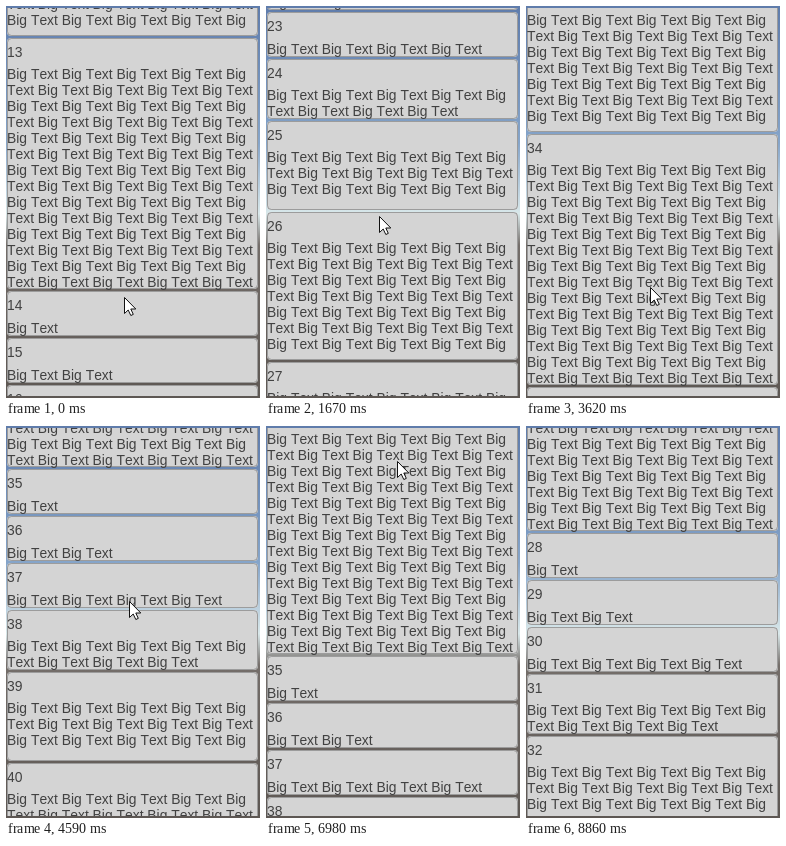
An HTML page with a canvas for the animation above (8.96 s loop, 254 by 392 pixels).

```html
<!DOCTYPE html>
<html lang="en">
<head>
<meta charset="utf-8">
<title>Big Text list</title>
<style>
  html, body { margin: 0; width: 100%; height: 100%; overflow: hidden; background: #5a5450; }
  canvas { display: block; }
</style>
</head>
<body>
<canvas id="stage" width="254" height="392"></canvas>
<script>
const W = 254, H = 392;
const LOOP = 8960, STEPS = 68, STEP_PHASE = 0.6;
const WORDS_PER_LINE = 9, LINE_HEIGHT = 16, ROW_KINDS = 7;
const ctx = document.getElementById('stage').getContext('2d');

// Key points by screen update; each drag of the list gives one sweep of the pointer.
const SCROLL = [
  { at: 0, y: 1095 }, { at: 7, y: 1827 }, { at: 20, y: 2515 }, { at: 28, y: 3090 },
  { at: 42, y: 3722 }, { at: 44, y: 3765 }, { at: 53, y: 3241 }, { at: 67, y: 2667 }
];
const POINTER = [
  { at: 0, x: 118, y: 291 }, { at: 7, x: 86, y: 111 }, { at: 20, x: 146, y: 335 },
  { at: 24, x: 128, y: 2 }, { at: 28, x: 124, y: 281 }, { at: 42, x: 123, y: 69 },
  { at: 48, x: 135, y: 300 }, { at: 53, x: 131, y: 35 }, { at: 66, x: 140, y: 410 }
];

// Smooth curve through the keys; flat at turning points.
function follow(keys, at, axis) {
  const last = keys.length - 1;
  const slope = i => {
    const a = keys[Math.max(i - 1, 0)], b = keys[i], c = keys[Math.min(i + 1, last)];
    const turns = (b[axis] - a[axis]) * (c[axis] - b[axis]) < 0;
    return turns ? 0 : (c[axis] - a[axis]) / (c.at - a.at);
  };
  let i = 0;
  while (i < last - 1 && at >= keys[i + 1].at) i++;
  const a = keys[i], b = keys[i + 1], span = b.at - a.at;
  const u = Math.min((at - a.at) / span, 1), v = 1 - u;
  return Math.round(a[axis] * (1 + 2 * u) * v * v + b[axis] * u * u * (3 - 2 * u)
    + span * (slope(i) * u * v * v - slope(i + 1) * u * u * v));
}

// Text doubles from row to row, then starts over. Lines that do not fit the row are cut.
function rowLayout(index) {
  const words = 2 << (index % ROW_KINDS);
  const height = Math.round(32.3 + 14.7 * Math.ceil(words / WORDS_PER_LINE));
  const lines = Math.floor((height - 29) / LINE_HEIGHT);
  return { words, height, lines };
}

const sky = ctx.createLinearGradient(0, 0, 0, H);
[[0, '#5f7cab'], [0.35, '#86a5c9'], [0.53, '#d9e8ea'], [0.61, '#746e6a'], [1, '#5d5753']]
  .forEach(([at, color]) => sky.addColorStop(at, color));

function panel(y, height, inset) {
  ctx.beginPath();
  ctx.roundRect(1 + inset, y + inset, 251 - 2 * inset, height - 2 * inset, 4);
}

function drawRow(index, { words, height, lines }, y) {
  panel(y - 14, height - 2, 0);
  ctx.fillStyle = '#d4d4d4';
  ctx.fill();
  panel(y - 14, height - 2, 0.5);
  ctx.strokeStyle = 'rgba(70, 70, 70, 0.4)';
  ctx.stroke();

  ctx.fillStyle = '#414141';
  ctx.fillText(index, 1, y + 5);
  const top = y + (lines > 1 ? 27 : 28);
  for (let line = 0; line < lines; line++) {
    const first = line * WORDS_PER_LINE;
    const count = Math.min(WORDS_PER_LINE, words - first);
    const text = Array.from({ length: count }, (_, i) => (first + i) % 2 ? 'Text' : 'Big').join(' ');
    ctx.fillText(text, 1, top + line * LINE_HEIGHT);
  }
}

function drawList(scroll) {
  ctx.save();
  ctx.beginPath();
  ctx.rect(0, 2, W, H - 4);
  ctx.clip();
  for (let index = 0, y = -scroll; y < H + 16; index++) {
    const layout = rowLayout(index);
    if (y + layout.height > -16) drawRow(index, layout, y);
    y += layout.height;
  }
  ctx.restore();
}

const arrow = new Path2D('M.5 .5V16.5L4.2 13L6.8 18.5L9.3 17.4L6.8 12H11.8Z');
function drawPointer(x, y) {
  ctx.save();
  ctx.translate(x, y);
  ctx.fillStyle = '#fff';
  ctx.strokeStyle = '#111';
  ctx.fill(arrow);
  ctx.stroke(arrow);
  ctx.restore();
}

function draw(now) {
  const step = Math.min(STEPS - 1, Math.floor((now % LOOP) / LOOP * STEPS + STEP_PHASE));
  ctx.fillStyle = sky;
  ctx.fillRect(0, 0, W, H);
  ctx.font = '13.88px "Liberation Sans", Arial, sans-serif';
  ctx.fontKerning = 'none';
  drawList(follow(SCROLL, step, 'y'));
  drawPointer(follow(POINTER, step, 'x'), follow(POINTER, step, 'y'));
}

const began = performance.now();
function tick() {
  draw(performance.now() - began);
  requestAnimationFrame(tick);
}
tick();
</script>
</body>
</html>
```
